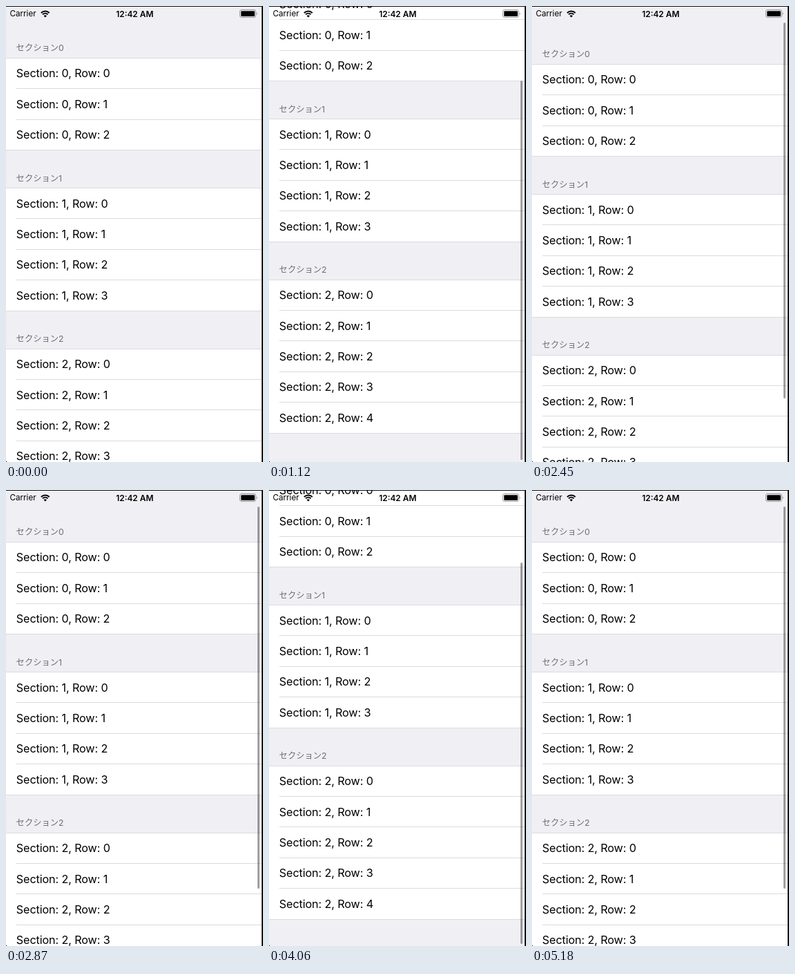
An HTML page that plays this animation: 372x660 px, repeating every 5250 ms.

```html
<!DOCTYPE html>
<html lang="ja">
<head>
<meta charset="utf-8">
<title>Sections</title>
<style>
  html, body { margin: 0; width: 100%; height: 100%; overflow: hidden; background: #f0eff4; }
  body { font-family: Inter, "Noto Sans CJK JP", "Noto Sans CJK", sans-serif; color: #000; }
  #stage { position: relative; width: 372px; height: 660px; overflow: hidden; background: #f0eff4; }
  #list { position: absolute; left: 0; top: 0; width: 370px; }

  section { position: relative; padding-top: 55.1px; }
  section:first-child { padding-top: 75.4px; }
  h2 {
    position: absolute; left: 14.6px; margin: -24px 0 0;
    font-size: 12.3px; font-weight: 400; line-height: 20px; color: #6d6d72;
  }
  .rows { position: relative; background: #fff; }
  .row {
    position: relative; height: 44.4px; padding-left: 14.8px;
    font-size: 16.2px; line-height: 44px; letter-spacing: -.12px; white-space: pre;
  }
  .rows::before, .row::after {
    content: ""; position: absolute; left: 0; right: 0; height: 1px; background: #dbdbdf;
  }
  .rows::before { top: -.2px; }
  .row::after { left: 15px; bottom: -.4px; }
  .row:last-child::after { left: 0; }

  #bar { position: absolute; left: 364px; width: 3px; border-radius: 1.5px; background: rgba(0, 0, 0, .37); }

  .status { position: absolute; top: 1px; line-height: 21px; font-size: 11.7px; white-space: pre; }
  .carrier { left: 5.4px; }
  .time { left: 86.3px; width: 200px; text-align: center; font-size: 11.9px; font-weight: 600; }
  svg { position: absolute; left: 0; top: 0; }
</style>
</head>
<body>
<div id="stage">
  <div id="list"></div>
  <div id="bar"></div>
  <div class="status carrier">Carrier</div>
  <div class="status time">12:42 AM</div>
  <svg width="372" height="660">
    <g fill="none" stroke="#000" stroke-width="2.1">
      <path d="M50.9 9.9a8.4 8.4 0 0 1 11.8 0"/>
      <path d="M53.1 12.3a5.3 5.3 0 0 1 7.4 0"/>
    </g>
    <path d="M56.8 16.6l-2.2-2.3a3.1 3.1 0 0 1 4.4 0z"/>
    <rect x="338.5" y="5.5" width="23" height="11" rx="2.5" fill="none" stroke="#000" stroke-opacity=".38"/>
    <rect x="340.2" y="7.2" width="19.8" height="7.8" rx="1.2"/>
    <path d="M362.8 9.4a2 2 0 0 1 0 3.4z" fill-opacity=".45"/>
    <path d="M0 0H372V660H370V1H0zM0 658.5L1.5 660H0z" fill="#111"/>
  </svg>
</div>
<script>
  const LOOP = 5250, STEP = 70, MAX = 96, DECAY = 7;
  const list = document.getElementById('list');
  const bar = document.getElementById('bar');

  list.innerHTML = [3, 4, 5].map((count, s) => {
    const rows = Array.from({ length: count }, (_, r) => `<div class="row">Section: ${s}, Row: ${r}</div>`);
    return `<section><h2>セクション${s}</h2><div class="rows">${rows.join('')}</div></section>`;
  }).join('');

  // Drags: start ms, end ms, scroll offset reached
  const drags = [
    [0, 350, 30],
    [420, 910, MAX + 17.4],
    [2030, 2310, -24],
    [3080, 3640, MAX + 19],
    [4200, 4620, -24]
  ];

  const clamp = v => Math.max(0, Math.min(MAX, v));
  const ease = p => p * p * (3 - 2 * p);

  // Each drag eases to its offset, then springs back inside the limits
  function offset(t) {
    let rest = 0, y = 0;
    for (const [start, end, to] of drags) {
      if (t < start) break;
      const limit = clamp(to);
      y = t < end
        ? rest + (to - rest) * ease((t - start) / (end - start))
        : limit + (to - limit) * Math.exp(-DECAY * (t - end) / 1000);
      rest = limit;
    }
    return Math.round(y);
  }

  function barOpacity(t) {
    if (t < 70 || (t >= 1680 && t < 2030) || (t >= 3010 && t < 3150)) return 0;
    return t >= 1610 && t < 1680 ? .5 : 1;
  }

  function draw(now) {
    const t = Math.floor(now % LOOP / STEP) * STEP;
    const y = offset(t), inside = clamp(y), over = y - inside;
    list.style.transform = `translateY(${-y}px)`;
    bar.style.top = 24 + 80 * inside / MAX + Math.max(0, over) + 'px';
    bar.style.height = 553 - Math.abs(over) + 'px';
    bar.style.opacity = barOpacity(t);
  }

  let origin;
  function tick(now) {
    origin ??= now;
    draw(now - origin);
    requestAnimationFrame(tick);
  }
  draw(0);
  requestAnimationFrame(tick);
</script>
</body>
</html>
```
